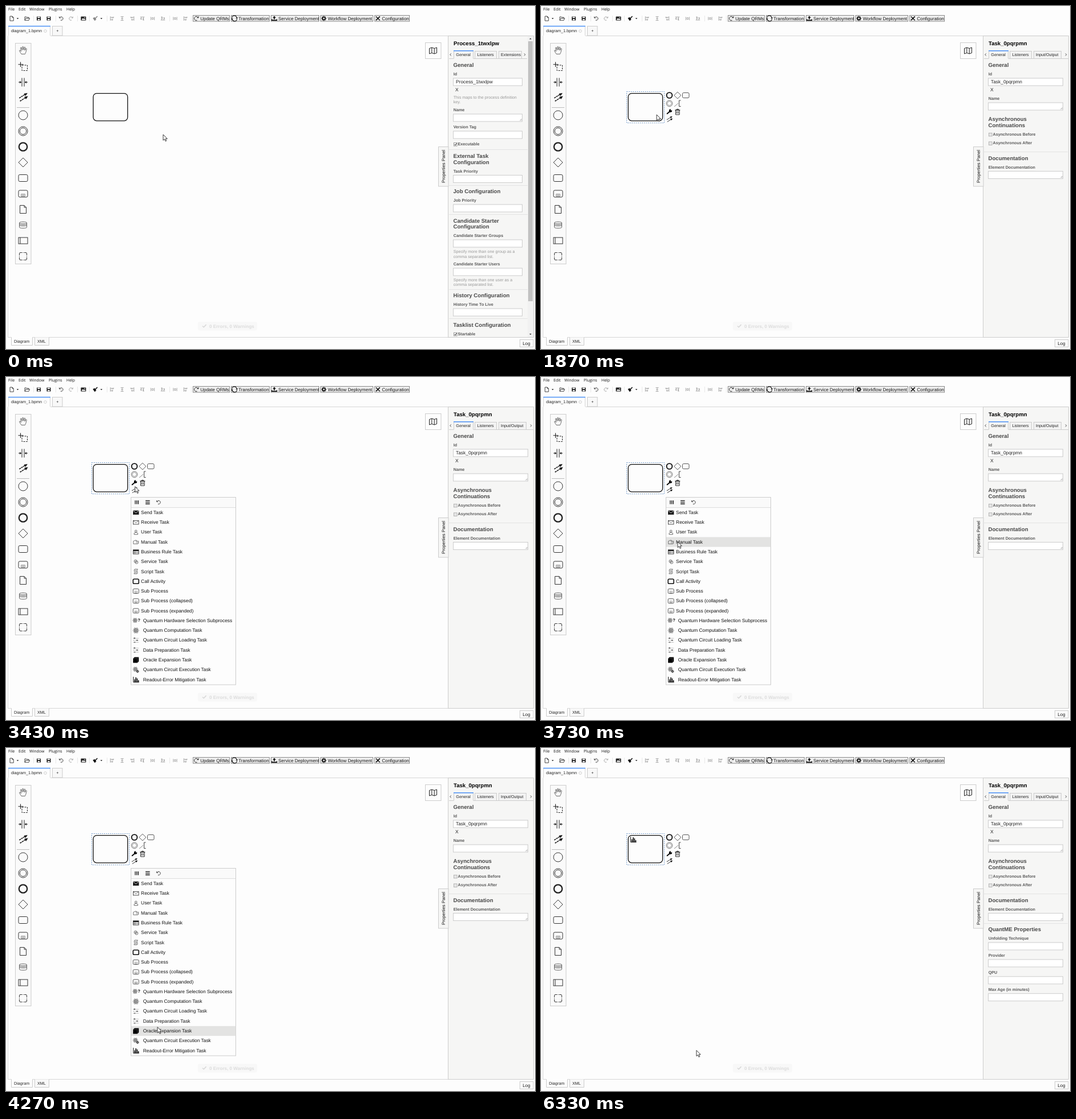
Animation, 929 px wide and 603 px high, one loop 7.13 s. Source, as an HTML page:

```html
<!DOCTYPE html>
<html lang="en">
<head>
<meta charset="utf-8">
<title>Modeler</title>
<style>
html, body { margin: 0; width: 100%; height: 100%; overflow: hidden; background: #fdfdfd; }
svg { display: block; width: 929px; height: 603px; font-family: "Liberation Sans", Arial, sans-serif; }
text { text-rendering: geometricPrecision; white-space: pre; }
.b { font-weight: bold; }
.n { fill: none; }
</style>
</head>
<body>
<svg id="stage" viewBox="0 0 929 603"></svg>
<script>
const LOOP = 7130;
const PANEL = '#f6f6f5';

// drawing helpers
const T = (x, y, s, size = 7.2, fill = '#222', more = '') =>
  `<text x="${x}" y="${y}" font-size="${size}" fill="${fill}" ${more}>${s}</text>`;
const R = (x, y, w, h, fill = 'none', stroke = 'none', more = '') =>
  `<rect x="${x}" y="${y}" width="${w}" height="${h}" fill="${fill}" stroke="${stroke}" ${more}/>`;
const P = (d, stroke = '#222', w = 1, fill = 'none', more = '') =>
  `<path d="${d}" fill="${fill}" stroke="${stroke}" stroke-width="${w}" ${more}/>`;
const C = (x, y, r, w = 1, stroke = '#222', fill = 'none') =>
  `<circle cx="${x}" cy="${y}" r="${r}" fill="${fill}" stroke="${stroke}" stroke-width="${w}"/>`;
const G = (x, y, s, more = '') => `<g transform="translate(${x} ${y}) ${more}">${s}</g>`;
const group = (id, s) => `<g id="${id}">${s}</g>`;

// shared icons, centred on 0,0
const caret = P('M-1.8-1h3.6L0 1.2z', 'none', 0, '#333');
const gear = C(0, 0, 2.5, 2) + P('M0-4.6V-3M0 3v1.6M-4.6 0H-3M3 0h1.6M-3.2-3.2l1 1M2.2 2.2l1 1M-3.2 3.2l1-1M2.2-2.2l1-1', '#222', 1.6);
const wrench = P('M-4.5 4 1.5-1', '#000', 1.8) + P('M4.6-2.2A2.7 2.7 0 1 1 2.4-4.4L2.2-2.4z', 'none', 0, '#000');
const bars = P('M-4.5-5V4.5H5.5', '#111', 1) + P('M-2.3 4V-.5M0 4v-8M2.3 4V-2M4.4 4V1', '#111', 1.6);
const atom = [0, 60, 120].map(a => `<ellipse rx="5" ry="2" class="n" stroke="#444" stroke-width=".7" transform="rotate(${a})"/>`).join('') + C(0, 0, .9, 0, 'none', '#222');
const undo = P('M-2.7-1.4A3.1 3.1 0 1 1-1.2 2.9M-3.4-3.4v2.4h2.4', 'currentColor', .85);
const subProc = R(-5, -4, 10, 8, 'none', '#444', 'rx="1.5" stroke-width=".9"') + R(-2, .3, 4, 2.4, 'none', '#555', 'stroke-width=".6"');
const connect = P('M-5 1 3-4M-4 5 4 0', '#111', 1.1, 'none', 'stroke-dasharray="2.4 .6"') +
  P('M5.8-5.6 1-4.9l2.2 3.2zM6.4-1.4 1.6-.7l2.2 3.2z', 'none', 0, '#111');
const circuit = P('M-5-3.5H5M-5 0H5M-5 3.5H5', '#777', .7, 'none', 'stroke-dasharray="2 1"') +
  R(-3.5, -4.7, 2, 2, '#444') + R(1, -1, 2, 2, '#444') + R(-3, 2.6, 1.8, 1.8, '#666');
const save = R(-3.5, -3.5, 7, 7, '#222', 'none', 'rx=".8"') + R(-2, -3, 4, 2, '#fff') + R(-1.7, .8, 3.4, 2.2, '#fff');

function toolbar() {
  const menus = [[4, 'File'], [22, 'Edit'], [41, 'Window'], [75, 'Plugins'], [106, 'Help']];
  let s = menus.map(([x, m]) => T(x, 8.3, m, 7, '#111', 'font-family="Open Sans, sans-serif"')).join('');
  s += G(10, 22, P('M-3-4H1L3.2-1.8V4H-3zM1-4v2.2h2.2', '#333', .9)) + G(20.5, 22, caret);
  s += G(37, 22, P('M-4 3.2V-3h2.6l1 1H3v1.6M-4 3.2-2.2-.4H4.6L3 3.2z', '#333', .9));
  s += G(57.5, 22, save) + G(75, 22, save);
  s += G(97, 22, undo) + `<g color="#999">${G(114, 22, undo, 'scale(-1 1)')}</g>`;
  s += G(136, 22, R(-4.5, -3.5, 9, 7, '#222', 'none', 'rx=".8"') + P('M-3.5 2.5-1-.8.6 1l1.2-1.2 2 2.7z', 'none', 0, '#fff') + C(2, -1.6, .8, 0, 'none', '#fff'));
  const align = P('M-3-4.2V4.2M-3-2.3H3.2M-3 2H1.5M3.2-3.5v2.2H-1M1.5 1v2.2H-1', '#999', .9);
  const centre = P('M0-4.2V4.2M-3-3.6H3M-2.2 0h4.4M-3 3.6H3', '#999', .9);
  const spread = P('M-3.5-3.2v6.4M3.5-3.2v6.4M-1.4-1.6h2.8v3.2h-2.8z', '#999', .9);
  [[186, align], [204, centre], [222, align, 'scale(-1 1)'], [239.5, align, 'rotate(90)'], [257.5, spread],
   [275.5, align, 'rotate(-90)'], [297, spread], [315, align]].forEach(([x, d, m]) => s += G(x, 22, d, (m || '') + ' scale(.9)'));
  s += [48, 87, 125, 146, 177, 287, 325].map(x => P(`M${x}.5 17v10`, '#e8e8e8')).join('');
  const plug = [
    [328, 65, 'Update QRMs', G(0, 0, undo, 'scale(-1.2 1.2)')],
    [395, 68, 'Transformation', P('M-4.5-1.5A4 3.5 0 0 1 4-1.2M4.5 1.5A4 3.5 0 0 1-4 1.2', '#111', 1.3) + P('M5.5-2.6v3h-3zM-5.5 2.6v-3h3z', 'none', 0, '#111')],
    [465, 85, 'Service Deployment', P('M0 1.5V-2', '#111', 2) + P('M-3-1.2 0-4.6l3 3.4z', 'none', 0, '#111') + P('M-4.5 1.5v2h9v-2', '#111', 1.6)],
    [552, 93, 'Workflow Deployment', gear],
    [647, 62, 'Configuration', P('M-3.6-3.6 3.6 3.6', '#111', 1.5) + P('M-3.6 3.6 3.6-3.6', '#111', 1.8)]];
  plug.forEach(([x, w, label, icon]) => {
    s += R(x + .5, 16.5, w - 1, 10.5, '#efefef', '#8a8a8a');
    s += G(x + 6.2, 21.8, icon, 'scale(.95)') + T(x + 13.2, 24.6, label, 8, '#111');
  });
  return s;
}

const brush = c => G(157, 22, P('M-1 .5 3.5-4', c, 1.6) + P('M-4.5-.5-1.6-2.4 1.6 1.2-1 4.2z', 'none', 0, c)) + G(167.5, 22, caret);

function frame() {
  return P('M3.5 582.5V52.5H926.5V582.5z', '#d6d6d6', 1, '#fdfdfd') +
    R(4, 35, 74, 18, '#fdfdfd') + P('M4.5 52V36M77.5 36V52', '#d6d6d6') + P('M4 35.5H78', '#4a90f5', 1.5) +
    T(9, 46.2, 'diagram_1.bpmn') + C(69, 44, 2.3, .7, '#bbb') +
    R(81.5, 35.5, 17.5, 16.5, '#f8f8f8', '#ccc') + T(88.2, 46, '+', 7.2) +
    P('M9.5 582.5V596.5H46.5V582.5', '#ccc', 1, '#fdfdfd') + R(9.9, 581.8, 36.2, 1.4, '#fdfdfd') + T(14, 591.8, 'Diagram') +
    P('M50.5 582.5V596.5H75.5V582.5', '#ccc', 1, '#f8f8f8') + T(55, 591.8, 'XML') +
    R(902.5, 586.5, 23.5, 13, '#fafafa', '#ccc') + T(907.3, 595.6, 'Log', 8) +
    R(337, 555, 104, 15.5, '#f8f8f8', 'none', 'rx="3"') + P('M345 562.5l2.2 2.2 4.4-4.6', '#d8d8d8', 1.6) +
    T(357, 565.5, '0 Errors, 0 Warnings', 8.1, '#dcdcdc', 'class="b"') +
    R(736.5, 64.5, 27.5, 28, '#fdfdfd', '#ccc') +
    G(750, 78.5, P('M-6.5-4-2.2-5.5 2.2-4 6.5-5.5V4L2.2 5.5-2.2 4-6.5 5.5zM-2.2-5.5V4M2.2-4V5.5', '#222', 1));
}

function palette() {
  const corner = P('M-6.5-2V-4.5a2 2 0 0 1 2-2H-2M-6.5-.6V.6', '#222');
  const icons = [
    [78, P('M-3 6.5C-4.5 4-6.5 1.5-6.5.2c1-.8 2 .3 3 1.6L-4.6-4.6c.6-1 1.6-.6 2 .4L-1.6-.5-1.4-6c.4-1 1.6-1 1.9 0L.8-.8 2-5.4c.6-.9 1.7-.5 1.7.5L3 0 4.8-3.2c.8-.6 1.6 0 1.4.9C5.4 1 5 4 3.4 6.5z', '#444', .8)],
    [106, R(-2, -2, 9.5, 9.5, 'none', '#222', 'stroke-dasharray="3 1.6"') + P('M-4.5-7.5V1M-8.5-3.2H.5', '#222', 1.1)],
    [134, P('M-2-7.5V7.5M2-7.5V7.5', '#222', 1) + P('M-8 0h5M3 0h5', '#222', 1) + P('M-5.8-2.2v4.4L-3 0zM5.8-2.2v4.4L3 0z', 'none', 0, '#222')],
    [160.5, G(0, 0, connect, 'scale(1.35)')],
    [192, C(0, 0, 8, .9)],
    [220, C(0, 0, 8, .9) + C(0, 0, 5.8, .9)],
    [247.5, C(0, 0, 7.2, 2.3)],
    [275, P('M0-8 8 0 0 8-8 0z', '#222', .9)],
    [302.5, R(-8, -6, 16, 12, 'none', '#333', 'rx="2.2"')],
    [330, R(-8, -6, 16, 12, 'none', '#333', 'rx="2.2"') + R(-3.2, .8, 6.4, 3.6, 'none', '#555', 'stroke-width=".7"') + P('M-1.6 2.6h3.2', '#444', .7)],
    [357.5, P('M-5.5-7H2L5.5-3.5V7h-11zM2-7v3.5h3.5', '#333')],
    [385, P('M-6.5-4V4C-6.5 6.2 6.5 6.2 6.5 4V-4C6.5-6-6.5-6-6.5-4zM-6.5-3.6C-6.5-1.8 6.5-1.8 6.5-3.6M-6.5-1.6C-6.5.2 6.5.2 6.5-1.6M-6.5.4C-6.5 2.2 6.5 2.2 6.5.4', '#444', .8)],
    [412.5, R(-8, -5.5, 16, 11, 'none', '#333') + P('M-5-5.5v11', '#333')],
    [440, [0, 90, 180, 270].map(a => G(0, 0, corner, `rotate(${a})`)).join('')]];
  return R(16.5, 65.5, 27.5, 388, '#fafafa', '#ccc') + P('M19 178.5H41', '#bbb') +
    icons.map(([y, d]) => G(30, y, d)).join('');
}

// properties panel pieces; y is the vertical middle of each line
const head = (y, s) => T(785.5, y + 2.9, s, 9.65, '#484848', 'class="b"');
const label = (y, s) => T(785.7, y + 2.4, s, 7.2, '#5a5a5a', 'class="b"');
const note = (y, s) => T(785.7, y + 2.4, s, 7.2, '#999');
const rule = y => P(`M778 ${y}.5H925`, '#e3e3e3');
const field = (y, w, s = '') => R(785.5, y - 6.5, w, 13, '#fff', '#ccc') + T(790, y + 2.8, s, 8.4, '#222');
const area = (y, w) => field(y, w) + P(`M${781.5 + w} ${y + 5}l3-3M${783.3 + w} ${y + 5}l1.4-1.4`, '#888', .7);
const check = (y, s, on) => R(786.5, y - 2.2, 5.6, 5.6, on ? '#fff' : '#e6e6e6', on ? '#888' : '#a8a8a8', 'stroke-width=".8"') +
  (on ? P(`M787.6 ${y + .6}l1.4 1.6 2.4-3.6`, '#111', 1) : '') + label(y, s).replace('785.7', '793.5');

function panelBase(title, w, third, tabEnd) {
  return R(776.5, 52.5, 150, 530, PANEL, '#ccc') +
    T(786, 69.2, title, 9.6, '#000', 'class="b"') +
    P(`M778 92.5H${tabEnd}`, '#ccc') +
    R(786.5, 78.5, 34, 14.5, PANEL) + P('M786.5 92V79M820.5 79V92', '#ccc') + P('M786 78.7H821', '#4a90f5', 1.6) +
    R(823.5, 79.5, 38, 13, '#f3f3f3', '#ccc') + R(865.5, 79.5, w === 121 ? 40 : 48, 13, '#f3f3f3', '#ccc') +
    T(790.3, 88.4, 'General') + T(827.5, 88.4, 'Listeners') + T(869, 88.4, third) +
    P('M781.6 83.5l-1.8 2 1.8 2', '#333', .9) + P(`M${tabEnd - 5} 83.5l1.8 2-1.8 2`, '#333', .9) +
    head(104, 'General') + label(120, 'Id') + field(133.5, w, title) + T(789, 150, 'X', 8.4);
}

function processPanel() {
  const w = 121;
  return panelBase('Process_1twxlpw', w, 'Extensions', 915) +
    note(160.5, 'This maps to the process definition') + note(169, 'key.') +
    label(183, 'Name') + area(196.5, w) + label(212.5, 'Version Tag') + field(226.5, w) + check(242.7, 'Executable', true) + rule(252) +
    head(264, 'External Task') + head(275, 'Configuration') + label(290.5, 'Task Priority') + field(304, w) + rule(315) +
    head(326.5, 'Job Configuration') + label(342, 'Job Priority') + field(355.5, w) + rule(366) +
    head(378, 'Candidate Starter') + head(388.5, 'Configuration') + label(404, 'Candidate Starter Groups') + field(417.5, w) +
    note(432, 'Specify more than one group as a') + note(440.3, 'comma separated list.') +
    label(454, 'Candidate Starter Users') + field(467.5, w) +
    note(481.7, 'Specify more than one user as a') + note(490, 'comma separated list.') + rule(498) +
    head(509.5, 'History Configuration') + label(525, 'History Time To Live') + field(538.5, w) + rule(549) +
    head(561, 'Tasklist Configuration') + check(576.5, 'Startable', true) +
    R(916, 53, 10, 529, '#f1f1f1') + R(917, 62, 8, 457, '#c1c1c1') +
    G(921, 57.5, caret, 'scale(1 -1)') + G(921, 577, caret);
}

function taskPanel() {
  const w = 131;
  return panelBase('Task_0pqrpmn', w, 'Input/Output', 926) +
    label(163, 'Name') + area(176.5, w) +
    head(199, 'Asynchronous') + head(209.7, 'Continuations') + check(225.5, 'Asynchronous Before') + check(241, 'Asynchronous After') + rule(256) +
    head(268, 'Documentation') + label(283.3, 'Element Documentation') + area(297, w);
}

function quantumPanel() {
  const items = ['Unfolding Technique', 'Provider', 'QPU', 'Max Age (in minutes)'];
  return rule(308) + head(319.3, 'QuantME Properties') +
    items.map((s, i) => label(335 + i * 29.9, s) + field(348.5 + i * 29.9, 131)).join('');
}

const panelTab = R(759.5, 247.5, 17.5, 69.5, PANEL, '#ccc') +
  `<text transform="translate(770.7 282) rotate(-90)" text-anchor="middle" font-size="7.85" fill="#111">Properties Panel</text>`;

function pad() {
  return C(225.5, 157, 4.9, 1.9, '#111') + G(239.8, 157, P('M0-6 6 0 0 6-6 0z', '#333', .8)) + R(248.5, 152.5, 11.5, 9, 'none', '#444', 'rx="2" stroke-width=".9"') +
    C(225.5, 171.3, 5.4, 1, '#777') + C(225.5, 171.3, 3.7, .9, '#888') +
    P('M245.5 166h-3v10.5h3', '#333', .9) + P('M234.5 176.5 241 171', '#222', 1, 'none', 'stroke-dasharray="1.4 1.2"') +
    G(225.5, 185.8, wrench) +
    G(239.8, 186, P('M-3.3-3V5H3.3V-3zM-4.6-3H4.6M-1.5-3v-1.7h3V-3M-1.2-1v4M1.2-1v4', '#222', 1)) +
    G(225.5, 199, connect, 'scale(.9)');
}

const ROW = 17.28, TOP = 229.6;
const envelope = (fill, line) => R(-4.8, -3.2, 9.6, 6.6, fill, '#222', 'stroke-width=".8"') + P('M-4.8-3 0 .8 4.8-3', line, .8);
const rows = [
  ['Send Task', envelope('#111', '#fff')],
  ['Receive Task', envelope('#fff', '#555')],
  ['User Task', C(0, -1.8, 1.8, .8, '#444') + P('M-3.2 4V1.8L-1.4.4h2.8L3.2 1.8V4z', '#444', .8)],
  ['Manual Task', P('M-4.5-1.5-1-3h2L0-1.5h4.5v4L3 3.3h-7.5z', '#555', .8) + P('M0 .2h4M0 1.8h4', '#777', .6)],
  ['Business Rule Task', R(-4.8, -3.5, 9.6, 7.2, 'none', '#222', 'stroke-width=".9"') + R(-4.8, -3.5, 9.6, 2.4, '#222') + P('M-4.8 1.2h9.6M-2-1v4.5', '#333', .7)],
  ['Service Task', G(-.7, -.7, C(0, 0, 2.6, .9, '#666') + C(0, 0, 1, .6, '#666')) + C(1.2, 1.2, 2.4, .9, '#666')],
  ['Script Task', P('M-2.2-4H3.2C.2-1.5 4.2.5 2 4h-5.4C-.8.8-4.6-1-2.2-4zM-1.6-1.6h2.4M-1 .2h2.6M-1.2 2h2.4', '#444', .8)],
  ['Call Activity', R(-5, -4, 10, 8, 'none', '#111', 'rx="1.8" stroke-width="1.6"')],
  ['Sub Process', subProc], ['Sub Process (collapsed)', subProc], ['Sub Process (expanded)', subProc],
  ['Quantum Hardware Selection Subprocess', G(-1.5, -.5, atom, 'scale(.85)') + T(3, 2, '?', 7.5, '#111', 'class="b"')],
  ['Quantum Computation Task', atom],
  ['Quantum Circuit Loading Task', circuit],
  ['Data Preparation Task', circuit],
  ['Oracle Expansion Task', P('M-5-2.5-2.5-5H5V2.5L2.5 5H-5z', 'none', 0, '#000') + P('M-5-2.5H2.5V5M2.5-2.5 5-5', '#777', .5)],
  ['Quantum Circuit Execution Task', G(-1, -1, atom, 'scale(.85)') + G(2.8, 2.8, gear, 'scale(.55)')],
  ['Readout-Error Mitigation Task', bars]];

function menu() {
  return R(219.5, 211.5, 184, 329.5, '#fdfdfd', '#ccc') + R(220, 212, 183, 17, '#fafafa') + P('M220 229.5H403', '#ddd') +
    R(220, 0, 183.2, ROW, '#e3e3e2', 'none', 'id="hover"') +
    P('M227 217v6.6M229.7 217v6.6M232.4 217v6.6M245 217.4h7.6M245 220.2h7.6M245 223h7.6', '#111', 1.3) + G(268, 220.3, undo) +
    rows.map(([s, icon], i) => {
      const y = TOP + ROW * (i + .5);
      return G(228.2, y, icon) + T(i < 11 ? 237.1 : 240.8, y + 2.6, s, 8.4, '#111');
    }).join('');
}

document.getElementById('stage').innerHTML =
  `<g color="#222">${toolbar()}${group('brushOff', brush('#888'))}${group('brushOn', brush('#111'))}${frame()}${palette()}
  ${group('process', processPanel())}${group('task', taskPanel())}${group('quantum', quantumPanel())}${panelTab}
  ${R(153.2, 153.6, 60.4, 48.2, '#fdfdfd', '#111', 'rx="6" stroke-width="1.3"')}
  ${group('outline', R(150.5, 150.5, 66, 55, 'none', '#5a88c0', 'stroke-dasharray="1.8 1.8" stroke-width=".9"'))}
  ${group('pad', pad())}${group('marker', G(162, 161, bars))}${group('menu', menu())}
  ${group('cursor', P('M0 0V10.2L2.4 8 4.1 11.8 5.8 11 4.1 7.4H7.3z', '#222', .9, '#fff'))}</g>`;

// cursor path: time, x, y
const path = [
  [0, 276, 226], [100, 273, 225], [250, 254, 216], [400, 228, 205], [550, 206, 195], [730, 193, 189], [830, 190, 188],
  [1540, 190, 188], [1700, 194, 189.5], [1870, 203, 191], [2050, 215, 190.5], [2270, 224, 189], [2500, 226, 188],
  [3400, 226, 188], [3560, 229, 212], [3930, 253, 380], [4130, 262, 472], [4270, 266, 490.5], [4500, 270, 513], [4930, 273, 531.5],
  [LOOP, 273, 531.5]];
const el = id => document.getElementById(id);
const ramp = (t, a, b) => Math.min(1, Math.max(0, (t - a) / (b - a)));
const show = (id, v) => el(id).setAttribute('opacity', v);

function cursorAt(t) {
  const i = path.findIndex(p => p[0] > t);
  const a = path[i - 1], b = path[i], k = ramp(t, a[0], b[0]);
  return [a[1] + (b[1] - a[1]) * k, a[2] + (b[2] - a[2]) * k];
}

function draw(now) {
  const t = now % LOOP;
  const [x, y] = cursorAt(t);
  const picked = ramp(t, 1270, 1430), done = ramp(t, 5500, 6330);
  el('cursor').setAttribute('transform', `translate(${x.toFixed(2)} ${y.toFixed(2)})`);
  show('brushOff', 1 - picked);
  ['brushOn', 'task', 'pad'].forEach(id => show(id, picked));
  show('outline', t > 1270 || x < 214 ? 1 : 0);
  show('menu', ramp(t, 2770, 2930) * (1 - done));
  show('quantum', done);
  show('marker', done);
  const row = Math.floor((y - TOP) / ROW);
  show('hover', row >= 0 && row < rows.length ? 1 : 0);
  el('hover').setAttribute('y', TOP + ROW * Math.max(row, 0));
}

const start = performance.now();
function tick() {
  draw(performance.now() - start);
  requestAnimationFrame(tick);
}
tick();
</script>
</body>
</html>
```
